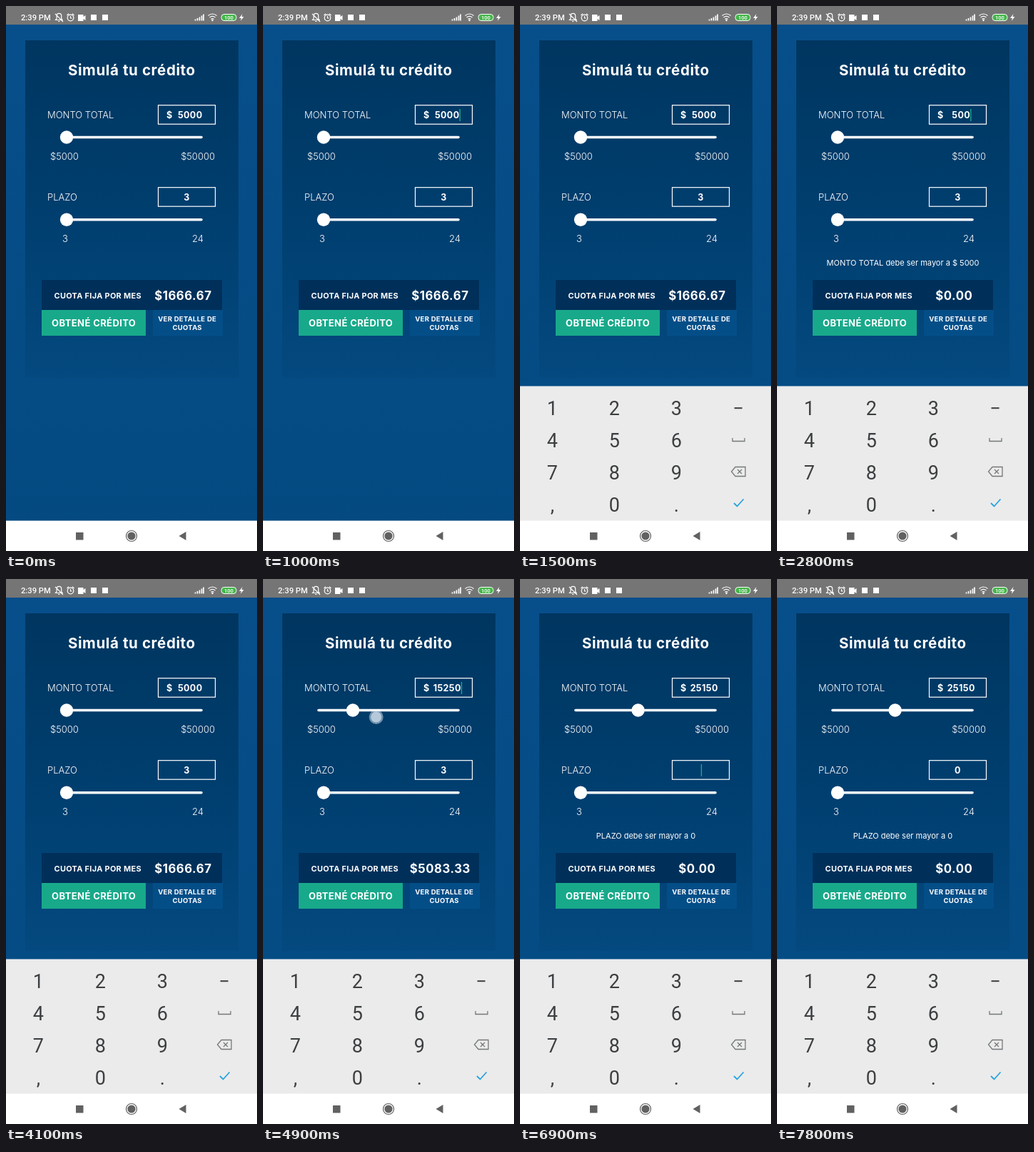
An HTML page that plays this animation: 352 by 762 pixels, repeating every 8 s.

```html
<!DOCTYPE html>
<html lang="es">
<head>
<meta charset="utf-8">
<title>Simulador de crédito</title>
<style>
html, body { margin: 0; width: 100%; height: 100%; overflow: hidden; background: #064b84; }
svg { display: block; width: 100vw; height: 100vh; }
text { font-family: Inter, "Open Sans", sans-serif; fill: #fff; }
.light { font-size: 13px; font-weight: 300; }
.bold { font-weight: 700; letter-spacing: .03em; }
.mid { text-anchor: middle; }
.key, .status { font-family: Roboto, sans-serif; }
.key { font-size: 27px; fill: #3c3f41; text-anchor: middle; }
.line { fill: none; stroke: #fff; stroke-width: 1.2; }
.icon { fill: none; stroke: #74787a; stroke-width: 1.3; }
.track { stroke: #fff; stroke-width: 3.6; stroke-linecap: round; }
</style>
</head>
<body>
<svg viewBox="0 0 352 762" preserveAspectRatio="none">
  <defs>
    <linearGradient id="sky" x2="0" y2="1">
      <stop stop-color="#074f8b"/><stop offset="1" stop-color="#044a81"/>
    </linearGradient>
    <linearGradient id="shade" x2="0" y2="1">
      <stop stop-color="#003660"/><stop offset=".55" stop-color="#003f70"/><stop offset="1" stop-color="#04497f"/>
    </linearGradient>
    <clipPath id="pane"><rect y="531.4" width="352" height="189"/></clipPath>
  </defs>

  <rect width="352" height="762" fill="url(#sky)"/>
  <rect x="27" y="48" width="299" height="472" fill="url(#shade)"/>

  <text class="bold mid" x="176.3" y="97" font-size="20.5">Simulá tu crédito</text>

  <text class="light" x="58" y="157">MONTO TOTAL</text>
  <rect class="line" x="213.5" y="138.7" width="80" height="26.5"/>
  <text class="bold" x="225" y="157" font-size="12.5">$</text>
  <text class="bold mid" id="amount" x="258.2" y="157" font-size="12.5"></text>
  <path class="track" d="M78 183.5H274"/>
  <circle id="thumb" cy="183.5" r="9.2" fill="#fff"/>
  <text class="light" x="62" y="215">$5000</text>
  <text class="light" x="293" y="215" text-anchor="end">$50000</text>

  <text class="light" x="58" y="272">PLAZO</text>
  <rect class="line" x="213.5" y="253.7" width="80" height="26.5"/>
  <text class="bold mid" id="term" x="253.5" y="272" font-size="12.5"></text>
  <path class="track" d="M78 298.8H274"/>
  <circle cx="85" cy="298.8" r="9.2" fill="#fff"/>
  <text class="light" x="79" y="330">3</text>
  <text class="light" x="277" y="330" text-anchor="end">24</text>

  <rect id="caret" width="1.4" height="17" fill="#18a98d"/>

  <text class="mid" id="error" x="176.5" y="363" font-size="11"></text>
  <rect x="50" y="383" width="253" height="42" fill="#00305a"/>
  <text class="bold" x="67.5" y="409" font-size="10.9">CUOTA FIJA POR MES</text>
  <text class="bold mid" id="fee" x="248.3" y="411" font-size="16.8"></text>
  <rect x="50" y="425" width="146" height="36" fill="#18a98a"/>
  <text class="bold mid" x="123.2" y="448" font-size="13">OBTENÉ CRÉDITO</text>
  <rect x="206" y="425" width="98" height="36" fill="#044e88"/>
  <g class="bold mid" font-size="9.5">
    <text x="254.2" y="441">VER DETALLE DE</text>
    <text x="254.2" y="452.5">CUOTAS</text>
  </g>

  <g id="panel" clip-path="url(#pane)">
    <rect y="531.4" width="352" height="190" fill="#fafafa"/>
    <g id="keys">
      <rect y="531.4" width="352" height="190" fill="#ebebeb"/>
      <path class="icon" d="M298 604v4.5h17V604" stroke-width="1.6"/>
      <path class="icon" d="M302 644.5h14v13h-14l-5.5-6.5zM305 648l6 6m0-6l-6 6"/>
      <path d="M300 695l4.5 4.5 9-10" fill="none" stroke="#2aa3df" stroke-width="1.8"/>
    </g>
  </g>

  <rect width="352" height="26" fill="#757575"/>
  <text class="status" x="21" y="20" font-size="11.2" font-weight="500">2:39 PM</text>
  <g class="line">
    <path d="M69.5 19.5h9.5l-1.3-2v-3.8a3.3 3.3 0 0 0-6.6 0v3.8zM73 21.5h2.5M69 11l11 11"/>
    <circle cx="90.5" cy="16.5" r="4.3"/>
    <path d="M90.5 14v3h2M85.5 13l2.6-2.3M95.5 13l-2.6-2.3"/>
    <path d="M283.5 13.5q6-5 12 0M285.5 16q4-3.300 8 0M287.5 18.3q2-1.5 4 0"/>
  </g>
  <path d="M101 12h7.5v3l3-2v7l-3-2v3H101z" fill="#fff"/>
  <rect x="119" y="12" width="8" height="8" fill="#fff"/>
  <rect x="135" y="12" width="8" height="8" fill="#fff"/>
  <path d="M265.5 20.5v-2M268.5 20.5v-3.5M271.5 20.5v-5M274.5 20.5v-7M277 20.5v-9" stroke="#fff" stroke-width="1.7"/>
  <circle cx="289.5" cy="20" r="1.2" fill="#fff"/>
  <rect x="302" y="11.5" width="21" height="9" rx="4" fill="#43b649" stroke="#fff"/>
  <text class="status mid" x="312.5" y="18.8" font-size="7.5" font-weight="500">100</text>
  <path d="M331.5 11l-4.5 6h3l-1.2 4 4.7-6h-3z" fill="#fff"/>

  <rect y="719.6" width="352" height="43" fill="#fff"/>
  <g fill="#616161">
    <rect x="98" y="736" width="10.5" height="10.5"/>
    <circle cx="176" cy="741" r="5.6"/>
    <circle cx="176" cy="741" r="7.5" fill="none" stroke="#616161" stroke-width="1.2"/>
    <path d="M242.5 741l10-6v12z"/>
  </g>

  <g id="touch">
    <circle r="10" fill="#dce8f2" fill-opacity=".5"/>
    <circle r="7.5" fill="#dce8f2" fill-opacity=".65"/>
  </g>
</svg>
<script>
const LOOP = 8000, STEP = 100;
const $ = id => document.getElementById(id);
const clamp = v => Math.max(0, Math.min(1, v));
const show = (id, on) => $(id).setAttribute('visibility', on ? 'visible' : 'hidden');

['123−', '456', '789', ',0.'].forEach((row, r) => [...row].forEach((ch, c) => {
  const key = document.createElementNS('http://www.w3.org/2000/svg', 'text');
  key.setAttribute('class', 'key');
  key.setAttribute('x', 45.3 + 87 * c);
  key.setAttribute('y', 571.5 + 45.2 * r);
  key.textContent = ch;
  $('keys').append(key);
}));

// Moments of focus and typing; each restarts the caret blink.
const FOCUS = 1000, ERASE = 2500, RETYPE = 3500, NEXT = 5800, CLEAR = 6700, ZERO = 7300;
const edits = [FOCUS, ERASE, RETYPE, NEXT, CLEAR, ZERO];
const DRAG = 4500, DRAG_TIME = 445, LAG = 174;

// x, y, start, end
const taps = [
  [258, 153, 800, 1000], [306, 651, 2400, 2600], [132, 697, 3400, 3600],
  [254, 268, 5600, 5800], [306, 651, 6600, 6800], [132, 697, 7200, 7400]
];

function touchAt(t) {
  if (t >= DRAG - 100 && t < 5200) {
    return [85 + 82 * clamp((t - DRAG) / DRAG_TIME), 184 + 9 * clamp((t - DRAG) / 350)];
  }
  return taps.find(([, , from, to]) => t >= from && t < to);
}

function amountAt(t) {
  if (t >= ERASE && t < RETYPE) return 500;
  const pulled = clamp((t - DRAG - LAG) / DRAG_TIME);
  return 5000 + Math.round(20150 * pulled / 50) * 50;
}

function draw(t) {
  const amount = amountAt(t);
  const term = t < CLEAR ? '3' : t < ZERO ? '' : '0';
  const error = amount < 5000 ? 'MONTO TOTAL debe ser mayor a $ 5000'
    : term > 0 ? '' : 'PLAZO debe ser mayor a 0';
  $('amount').textContent = amount;
  $('term').textContent = term;
  $('error').textContent = error;
  $('fee').textContent = '$' + (error ? 0 : amount / term).toFixed(2);
  $('thumb').setAttribute('cx', 85 + 180 * clamp((amount - 5000) / 45000));

  const last = edits.filter(e => e <= t).pop();
  show('caret', last !== undefined && (t - last) % 1000 < 500);
  const [field, x, y] = t < NEXT ? ['amount', 258, 144] : ['term', 253.5, 259];
  $('caret').setAttribute('x', x + $(field).getComputedTextLength() / 2 + .2);
  $('caret').setAttribute('y', y);

  show('panel', t >= 1100);
  const rise = clamp((t - 1220) / 220);
  $('keys').setAttribute('transform', `translate(0 ${189 * (1 - rise) ** 2})`);

  const touch = touchAt(t);
  show('touch', touch);
  if (touch) $('touch').setAttribute('transform', `translate(${touch[0]} ${touch[1]})`);
}

const start = performance.now();
function tick() {
  const t = (performance.now() - start) % LOOP;
  draw(Math.floor(t / STEP) * STEP);
  requestAnimationFrame(tick);
}
tick();
</script>
</body>
</html>
```
